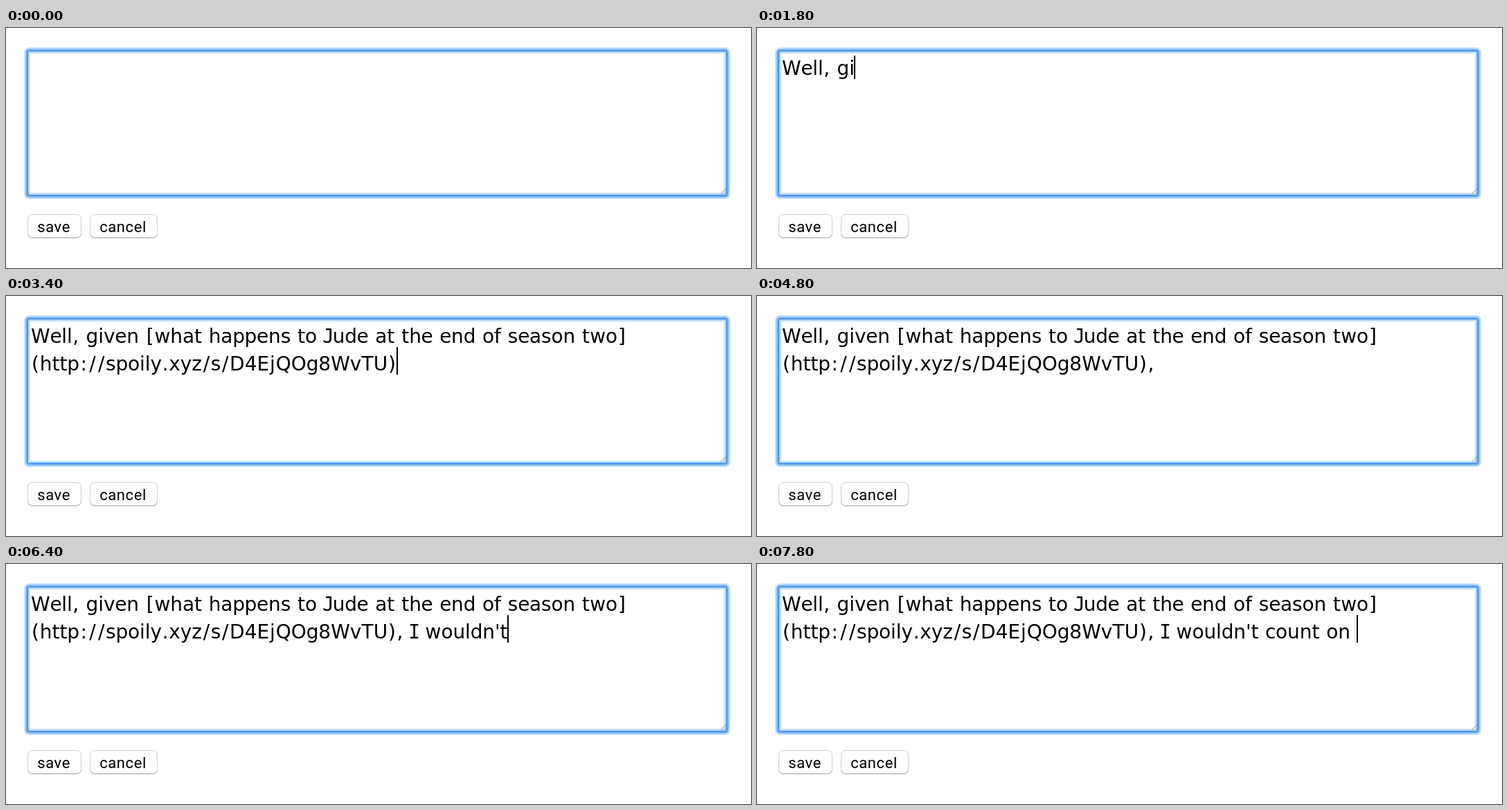
An HTML page for the animation above (8 s loop, 1076 px wide and 348 px high).

```html
<!DOCTYPE html>
<html lang="en">
<head>
<meta charset="utf-8">
<title>Comment box</title>
<style>
  html, body { margin: 0; width: 100%; height: 100%; overflow: hidden; background: #fff; }
  svg { display: block; width: 1076px; height: 348px; }
  .entry { font: 28px "DejaVu Sans", Verdana, sans-serif; white-space: pre; font-kerning: none; font-variant-ligatures: none; }
  .mono { font-family: "DejaVu Sans Mono", monospace; }
  .label { font: 22px Roboto, sans-serif; letter-spacing: .6px; }
  .ring rect { fill: none; stroke-width: 2; }
  .grip { stroke: #8a8a8a; stroke-width: 1; }
</style>
</head>
<body>
<svg viewBox="0 0 1076 348" xmlns="http://www.w3.org/2000/svg">
  <g class="ring">
    <rect x="27" y="29" width="1018" height="218" rx="6" stroke="#c5e1fb"/>
    <rect x="29" y="31" width="1014" height="214" rx="4" stroke="#86bdf6"/>
    <rect x="31" y="33" width="1010" height="210" rx="1.5" stroke="#4a94e6"/>
    <rect x="33" y="35" width="1006" height="206" stroke="#a9d2f6"/>
    <rect x="35" y="37" width="1002" height="202" stroke="#e6f2fc"/>
  </g>
  <path class="grip" d="M1032 241l8-8M1036.500 241l3.500-3.500"/>
  <g id="buttons"></g>
  <g id="lines" class="entry"></g>
  <rect id="caret" width="2"/>
</svg>
<script>
const NS = 'http://www.w3.org/2000/svg';
const SIZE = 28, LEFT = 36, LOOP = 8000;

function add(parent, tag, attrs, text = '') {
  const el = document.createElementNS(NS, tag);
  for (const key in attrs) el.setAttribute(key, attrs[key]);
  el.textContent = text;
  return parent.appendChild(el);
}

const buttons = document.getElementById('buttons');
for (const [label, x, width] of [['save', 31, 78], ['cancel', 121, 98]]) {
  add(buttons, 'rect', { x, y: 271, width, height: 34, rx: 7, fill: '#c2c2c2' });
  add(buttons, 'rect', { x: x + .5, y: 270.5, width: width - 1, height: 33, rx: 6.5, fill: '#fff', stroke: '#cfcfcf' });
  add(buttons, 'text', { x: x + 14.2, y: 296, class: 'label' }, label);
}

// Wide-set glyph advances, in thousandths of an em, grouped by width
const advance = {};
for (const [chars, width] of [
  ['ilI', 274], ["'", 269], ['j', 344], [' ', 352], [',.', 364], ['t', 394], ['I', 421],
  ['r', 427], ['f', 352], ['()[]/:J', 454], ['sc', 521], ['z', 525], ['vxyk', 592],
  ['e', 596], ['a', 601], ['o', 607], ['T', 616], ['gdpbq', 623], ['hnu', 633],
  ['E', 632], ['48', 636], ['U', 732], ['D', 771], ['QO', 787], ['w', 818], ['W', 989]
]) for (const c of chars) advance[c] = width / 1000 * SIZE;

const rows = [
  'Well, given [what happens to Jude at the end of season two]',
  "(http://spoily.xyz/s/D4EjQOg8WvTU), I wouldn't count on "
];
const pen = document.createElement('canvas').getContext('2d');
const lines = document.getElementById('lines');
const caret = document.getElementById('caret');
const glyphs = [], stops = [{ x: LEFT, row: 0 }];

rows.forEach((text, row) => {
  const line = add(lines, 'text', { y: 68 + 40 * row });
  let x = LEFT;
  for (const c of text) {
    const mono = 'IJ'.includes(c);
    pen.font = `${SIZE}px ${mono ? '"DejaVu Sans Mono", monospace' : '"DejaVu Sans", Verdana, sans-serif'}`;
    const inset = (advance[c] - pen.measureText(c).width) / 2;
    glyphs.push(add(line, 'tspan', { x: (x + inset).toFixed(2), class: mono ? 'mono' : '' }, c));
    x += advance[c];
    stops.push({ x, row });
  }
});

// [start time, text typed so far on the active row, caret visible]
const link = rows[1].slice(0, 34);
const steps = [
  [0, '', 0], [400, '', 1], [1000, '', 0], [1200, 'W', 1], [1400, 'We', 1],
  [1600, 'Well,', 1], [1800, 'Well, gi', 1], [2000, 'Well, give', 1],
  [2200, 'Well, given', 1], [2600, 'Well, given ', 1], [3000, 'Well, given ', 0],
  [3400, link, 1], [3800, link, 0], [4200, link, 1],
  [4400, link + ',', 1], [4600, link + ', ', 1], [4800, link + ', ', 0],
  [5000, link + ', I ', 1], [5200, link + ', I w', 1], [5400, link + ', I wou', 1],
  [5600, link + ', I woul', 1], [6000, link + ', I would', 1], [6200, link + ', I wouldn', 1],
  [6400, link + ", I wouldn't", 1], [6600, link + ", I wouldn't ", 1],
  [6800, link + ", I wouldn't c", 1], [7000, link + ", I wouldn't cou", 1],
  [7200, link + ", I wouldn't count", 1], [7400, link + ", I wouldn't count ", 1],
  [7600, link + ", I wouldn't count on", 1], [7800, rows[1], 1]
].map(([time, text, on]) => ({
  time, on, count: text.length + (text.startsWith('(') ? rows[0].length : 0)
}));

let shown;
function draw(now) {
  const time = now % LOOP;
  const step = steps.findLast(s => s.time <= time);
  if (step !== shown) {
    shown = step;
    glyphs.forEach((g, i) => g.setAttribute('visibility', i < step.count ? 'visible' : 'hidden'));
    const { x, row } = stops[step.count];
    caret.setAttribute('x', 2 * Math.round((x - .8) / 2));
    caret.setAttribute('y', row ? 74 : 40);
    caret.setAttribute('height', row ? 40 : 34);
    caret.setAttribute('visibility', step.on ? 'visible' : 'hidden');
  }
}
function tick() {
  draw(performance.now());
  requestAnimationFrame(tick);
}
tick();
</script>
</body>
</html>
```
